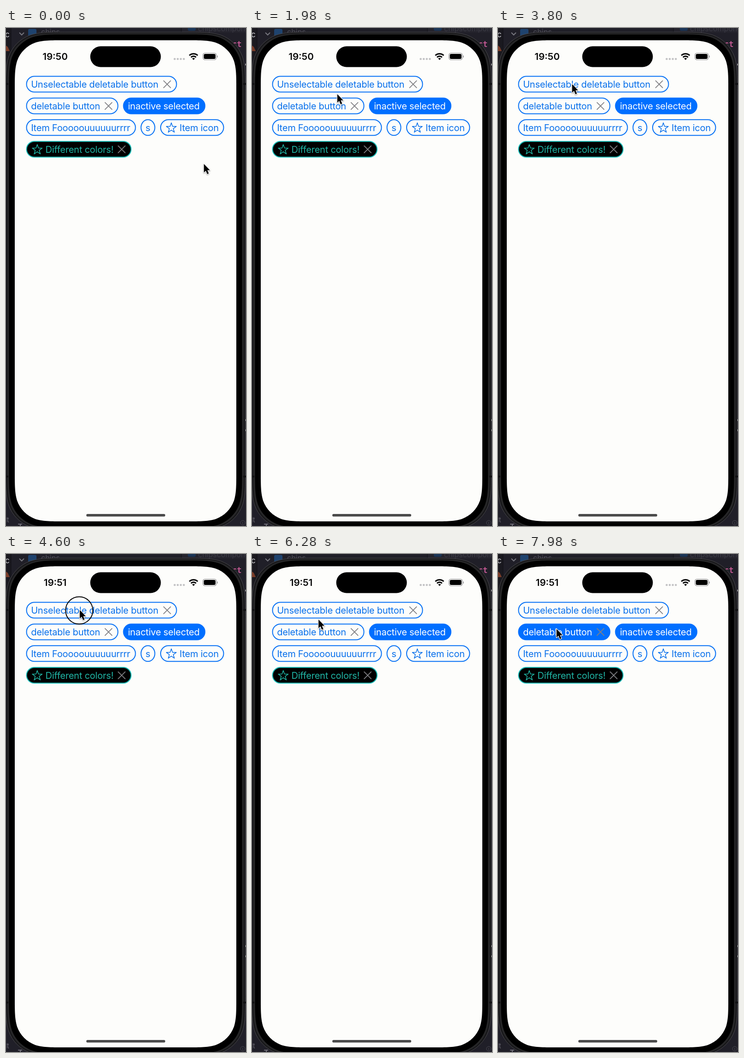
Animation of 520x1077 px, one loop 8 s. Source, as an HTML page:

```html
<!DOCTYPE html>
<html lang="en">
<head>
<meta charset="utf-8">
<title>Chips</title>
<style>
  html, body { margin: 0; width: 100%; height: 100%; overflow: hidden; background: #201f28; }
  svg { display: block; width: 520px; height: 1077px; }
  text { font-family: Inter, "Open Sans", sans-serif; white-space: pre; }
  .chip text { font-size: 20px; letter-spacing: -.23px; fill: var(--ink); }
  .chip rect { fill: var(--fill); stroke: var(--edge); stroke-width: 2; }
  .chip .star { fill: none; stroke: var(--ink); stroke-width: 1.5; stroke-linejoin: round; }
  .chip .cross { stroke: #808084; stroke-width: 1.8; stroke-linecap: round; }
  .outline { --ink: #0870eb; --fill: #fdfdfb; --edge: #0872f5; }
  .selected { --ink: #fff; --fill: #006fff; --edge: #006fff; }
  .teal { --ink: #20b5a5; --fill: #000; --edge: #18bdb8; }
  .mono { font-family: "DejaVu Sans Mono", monospace; }
</style>
</head>
<body>
<svg viewBox="0 0 520 1077">
  <!-- editor window behind the phone -->
  <rect width="520" height="1077" fill="#201f28"/>
  <path d="M0 0H11V120H0Z" fill="#1a191f"/>
  <path d="M380 0H520V10H380Z" fill="#25242d"/>
  <path d="M11 0V60M380 0V10" stroke="#111116"/>
  <text x="-2" y="20" font-size="17" fill="#c8c8cc">c</text>
  <path d="M0 50V38L4 41 8 50Z" fill="#7a3c28"/>
  <path d="M29 10l5 5 5-5" fill="none" stroke="#77777f" stroke-width="2"/>
  <rect x="48" y="2" width="18" height="16" rx="3" fill="#1f436e"/>
  <text x="76" y="14" font-size="16" fill="#4f4e58">chips</text>
  <rect x="394" y="-8" width="17" height="14" rx="3" fill="#1b3556"/>
  <text x="416" y="7" font-size="16" fill="#3c3b45">chipscomponent</text>
  <text class="mono" x="490" y="41" font-size="17" font-weight="700" fill="#bd578f">ct</text>
  <path d="M518.5 79h2M518.5 848h2M518.5 870h2" stroke="#aaa" stroke-width="4"/>
  <text x="-2" y="1069" font-size="15" fill="#65646d">lt</text>

  <g id="phone"></g>
  <path d="M0 121H5M0 970H5M514 121H520M514 970H520" stroke="#101012" stroke-width="4"/>
  <path d="M26 1073h9M31 1073v4" stroke="#85848c" stroke-width="1.6"/>
  <circle cx="513" cy="1070" r="5" fill="none" stroke="#494850"/>
  <path d="M513 1068v5" stroke="#494850"/>

  <!-- status bar -->
  <text id="clock" x="106.5" y="69" font-size="20.5" font-weight="600" text-anchor="middle" fill="#080808"></text>
  <rect x="182.5" y="39.5" width="153" height="45" rx="22.5"/>
  <path d="M365.5 67H386" stroke="#c3c3c5" stroke-width="4.6" stroke-linecap="round" stroke-dasharray="0 6.6"/>
  <g fill="none" stroke="#000" stroke-width="3">
    <path d="M397.3 59.3a13 13 0 0 1 18 0M400.8 63.3a8 8 0 0 1 11 0"/>
    <path d="M406.3 69.3l-3-3.2a4.4 4.4 0 0 1 6 0z" fill="#000" stroke="none"/>
  </g>
  <rect x="426.5" y="54" width="29.5" height="15" rx="5" fill="none" stroke="#98989a" stroke-width="1.2"/>
  <rect x="428.5" y="56" width="25.5" height="11" rx="3.2"/>
  <path d="M457.6 59.5q2 2 0 4.5z" fill="#98989a" stroke="#98989a" stroke-width=".7"/>

  <g id="chips"></g>
  <rect x="174" y="1051" width="171" height="5.6" rx="2.8" fill="#4a4a4a"/>

  <g id="pointer">
    <circle id="press" cx="-.4" cy="2" r="29.5" fill="none" stroke="#050505" stroke-width="2"/>
    <path d="M0 0V18.6L4.2 14.7 7.2 22 10.5 20.6 7.5 13.5H13Z" fill="#000" stroke="#fff" stroke-width="2.4"
          transform="translate(.8 1)" stroke-linejoin="round" paint-order="stroke"
          style="filter:drop-shadow(0 1px 1.2px #0006)"/>
  </g>
</svg>
<script>
const LOOP = 8000;
const $ = id => document.getElementById(id);

// one smooth corner, in units of its radius, from the side to the top
const corner = [[0, 1.528], [0, 1.088], [0, .868], [.075, .631], [.169, .372],
  [.372, .169], [.631, .075], [.868, 0], [1.088, 0], [1.528, 0]];

// rectangle whose corners ease into the straight sides
function smoothRect(x, y, w, h, r, style) {
  const part = (right, bottom) => {
    const points = corner.map(([u, v]) => [right ? x + w - u * r : x + u * r, bottom ? y + h - v * r : y + v * r]);
    if (right !== bottom) points.reverse();
    return points[0] + "C" + points.slice(1).join(" ");
  };
  const d = `M${part(0, 0)}L${part(1, 0)}L${part(1, 1)}L${part(0, 1)}Z`;
  return `<path d="${d}" ${style}/>`;
}

$("phone").innerHTML =
  smoothRect(-.5, 9, 519, 1076, 84, 'fill="#17171a" stroke="#4b4a4c"') +
  smoothRect(3, 11.5, 512, 1071, 82, 'fill="#272728"') +
  smoothRect(6.5, 14, 505, 1066, 80, 'fill="#000"') +
  smoothRect(19, 26.5, 480, 1040.5, 70, 'fill="#fdfdfb"');

// row, left, width, label, style, star, cross
const chips = [
  [0, 44.5, 325, "Unselectable deletable button", "outline", 0, 1],
  [1, 44.5, 198, "deletable button", "outline", 0, 1],
  [1, 254.5, 176.5, "inactive selected", "selected", 0, 0],
  [2, 44.5, 236, "Item Fooooouuuuuurrrr", "outline", 0, 0],
  [2, 292.5, 30, "s", "outline", 0, 0],
  [2, 335, 136.5, "Item icon", "outline", 1, 0],
  [3, 44.5, 226.5, "Different colors!", "teal", 1, 1]
];

const star = Array.from({ length: 10 }, (_, i) => {
  const r = i % 2 ? 4.5 : 11.3, a = i * Math.PI / 5;
  return [r * Math.sin(a), -r * Math.cos(a)].map(v => v.toFixed(2));
}).join(" ");

$("chips").innerHTML = chips.map(([row, x, w, label, style, hasStar, hasCross]) => `
  <g class="chip ${style}" transform="translate(${x} ${121.5 + row * 46.9})">
    <rect y="-17" width="${w}" height="34" rx="17"/>
    ${hasStar ? `<polygon class="star" points="${star}" transform="translate(23.2 1)"/>` : ""}
    <text x="${hasStar ? 41 : 9.7}" y="7.3">${label}</text>
    ${hasCross ? `<path class="cross" d="M${w - 27.9} -7.3l15 15m0-15l-15 15"/>` : ""}
  </g>`).join("");
const deletable = $("chips").children[1];

// time, x, y of the pointer tip
const path = [
  [0, 428, 293], [500, 425, 289], [1150, 425, 289], [1900, 187, 145], [1980, 184, 142],
  [2500, 175, 134], [3100, 161, 121], [4300, 159, 120], [5400, 159, 120],
  [6200, 144, 140], [6900, 126, 161], [LOOP, 126, 161]
];

function pointerAt(t) {
  const i = path.findIndex(key => key[0] > t);
  const [t0, x0, y0] = path[i - 1], [t1, x1, y1] = path[i];
  const u = (t - t0) / (t1 - t0), k = u * u * (3 - 2 * u);
  return [x0 + (x1 - x0) * k, y0 + (y1 - y0) * k];
}

const within = (t, from, to) => t >= from && t < to;

function draw(now) {
  const t = now % LOOP;
  $("pointer").setAttribute("transform", `translate(${pointerAt(t)})`);
  const pressed = within(t, 4450, 4750) || within(t, 7050, 7300);
  $("press").setAttribute("visibility", pressed ? "visible" : "hidden");
  $("clock").textContent = t < 3900 ? "19:50" : "19:51";
  deletable.setAttribute("class", "chip " + (t < 7250 ? "outline" : "selected"));
  requestAnimationFrame(draw);
}
draw(performance.now());
</script>
</body>
</html>
```
